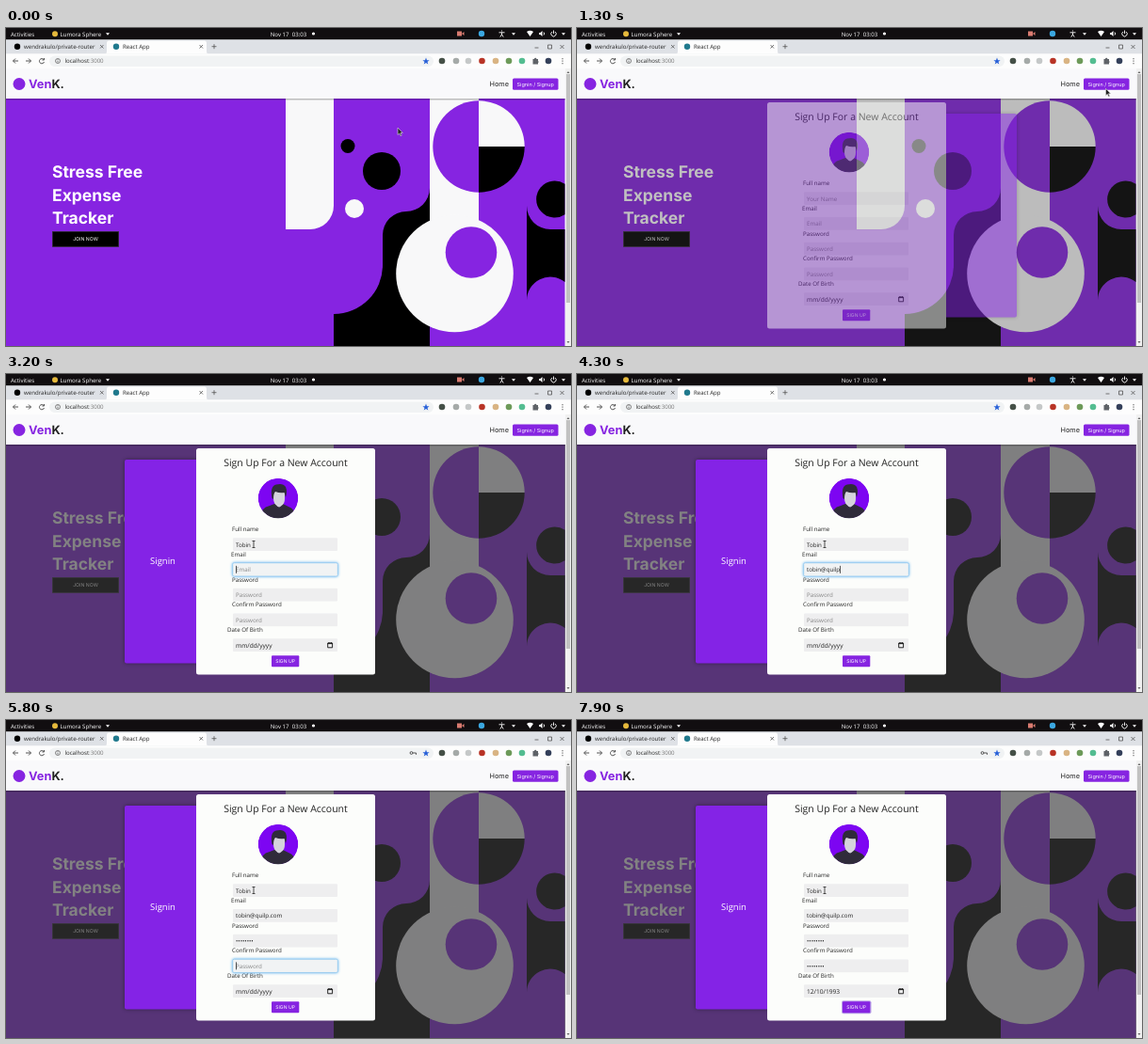
Animation, 600 px wide and 338 px high, one loop 8 s. Source, as an HTML page:

```html
<!DOCTYPE html>
<html lang="en">
<head>
<meta charset="utf-8">
<title>Expense tracker sign-up</title>
<style>
html, body { margin: 0; width: 100%; height: 100%; overflow: hidden; background: #f9f9fb; }
svg { display: block; width: 600px; height: 338px; }
text { font: 6.2px "Open Sans", "Noto Sans", sans-serif; fill: #222; text-rendering: geometricPrecision; }
.geo { font-family: Inter, "Open Sans", sans-serif; }
.mid { text-anchor: middle; }
.lite { fill: #fff; }
.ui { font: 6.1px "Open Sans", Roboto, sans-serif; }
.big { font-size: 17.5px; font-weight: 700; }
.p { fill: #8624e1; }
.w { fill: #f8f8f9; }
.line { fill: none; stroke: #555; }
#glow { filter: drop-shadow(0 0 1.6px #56aef0); }
#panel { filter: drop-shadow(0 0 2px #0006); }
</style>
</head>
<body>
<svg viewBox="0 0 600 338">
  <defs>
    <clipPath id="round"><circle cx="289" cy="132" r="21.3"/></clipPath>
    <clipPath id="view"><path d="M0 75H594V338H0Z"/></clipPath>
    <linearGradient id="shade" x2="0" y2="1">
      <stop stop-color="#000" stop-opacity=".3"/><stop offset="1" stop-color="#000" stop-opacity="0"/>
    </linearGradient>
  </defs>
  <rect width="600" height="338" fill="#f9f9fb"/>

  <g clip-path="url(#view)">
    <g id="page">
      <path class="p" d="M0 43H593.5V351H3Q0 351 0 348Z"/>
      <path class="w" d="M297 43H348V189A25 25 0 0 1 323 214H297Z"/>
      <circle cx="363" cy="125.5" r="7.5"/>
      <circle cx="399" cy="152" r="20"/>
      <circle class="w" cx="370" cy="192" r="10"/>
      <path d="M450 170A25 25 0 0 1 425 195A25 25 0 0 0 400 220V252A52 52 0 0 1 348 304V351H450Z"/>
      <path class="w" d="M450 43H502V220H450Z"/>
      <circle class="w" cx="476.5" cy="261" r="62.3"/>
      <circle class="p" cx="494" cy="238.5" r="27.3"/>
      <circle class="p" cx="502" cy="126" r="48.7"/>
      <path class="w" d="M502 126V77.3A48.7 48.7 0 0 1 550.7 126Z"/>
      <path d="M502 126H550.7A48.7 48.7 0 0 1 502 174.7Z"/>
      <path d="M593.5 165.8A19.5 19.5 0 1 0 593.5 198.2Z"/>
      <path d="M553 189A25 25 0 0 0 578 214H593.5V270A25 25 0 0 0 553 290Z"/>
      <text class="geo big lite" x="49" y="159">Stress Free</text>
      <text class="geo big lite" x="49" y="183.5">Expense</text>
      <text class="geo big lite" x="49" y="208">Tracker</text>
      <rect x="49.3" y="216.3" width="70.4" height="16.2" stroke="#333" stroke-width=".6"/>
      <text class="geo lite mid" x="84.5" y="226.2" style="font-size:5.2px">JOIN NOW</text>
      <text x="6.5" y="372" style="font-weight:700">2020 | Sed Ibalk</text>
    </g>
    <rect id="dim" y="75" width="594" height="263" fill="#3e3e3e" fill-opacity=".645"/>
  </g>

  <rect y="43" width="594" height="32" fill="#f9f9fb"/>
  <rect y="75" width="594" height="2.5" fill="url(#shade)"/>
  <circle class="p" cx="14" cy="59.5" r="6.5"/>
  <text class="geo" x="24" y="63.7" style="font-size:12.8px;font-weight:700"><tspan class="p">Ven</tspan>K.</text>
  <text class="geo" x="513.5" y="62" style="font-size:7.3px">Home</text>
  <rect class="p" x="538" y="53.5" width="48.5" height="12.2" rx="1.5"/>
  <text class="geo lite mid" x="562.2" y="61.5" style="font-size:5.5px">Signin / Signup</text>

  <rect x="594" y="43" width="6" height="295" fill="#f1f1f1"/>
  <rect id="thumb" x="595" y="49" width="4" height="243" fill="#c1c1c1"/>
  <path fill="#666" d="M595.5 48L597 46L598.5 48ZM595.5 333L597 335L598.5 333Z"/>

  <rect width="600" height="12.5" fill="#110e10"/>
  <text class="ui lite" x="5" y="8.6">Activities</text>
  <circle cx="52" cy="6.2" r="3" fill="#e5b93c"/>
  <text class="ui lite" x="57.5" y="8.6">Lumora Sphere</text>
  <text class="ui lite mid" x="300" y="8.6">Nov 17&#160; 03:03</text>
  <circle class="lite" cx="326.5" cy="6" r="1.6"/>
  <path class="lite" d="M106 5.2H110L108 7.8ZM590 5.2H594L592 7.8ZM537 5.2H541L539 7.8ZM553 4Q556.500 1.500 560 4L556.500 9ZM566 5H567.500L569.500 3V9L567.500 7H566Z"/>
  <path fill="#d97b70" d="M479 3.500H484V8.500H479ZM484 6L486.500 4V8Z"/>
  <circle cx="505" cy="6" r="3.2" fill="#3ba7e0"/>
  <path fill="none" stroke="#fff" stroke-width=".9" d="M523.500 4.800H529.500M526.500 4.800V7L524.800 9.500M526.500 7L528.200 9.500M526.500 2.500V3.500M571 4.500Q572.300 6 571 7.500M580 4A2.700 2.700 0 1 0 583 4M581.500 2.500V6"/>

  <rect y="12.500" width="600" height="15" fill="#dee1e6"/>
  <path fill="#fdfdfd" d="M105 27.500Q107 27.500 107 25V16Q107 13.500 109.500 13.500H210.500Q213 13.500 213 16V25Q213 27.500 215 27.500Z"/>
  <circle cx="12" cy="19.700" r="3.200"/>
  <text class="ui" x="19" y="22">wendrakulo/private-router</text>
  <circle cx="117" cy="19.700" r="3.200" fill="#20798d"/>
  <text class="ui" x="124" y="22">React App</text>
  <path class="line" stroke-width=".8" d="M100 18L103.500 21.500M103.500 18L100 21.500M205.500 18L209 21.500M209 18L205.500 21.500M218.500 19.700H223.500M221 17.200V22.200M561.500 21H565.500M575.500 18H579.500V22H575.500ZM588.500 18L592.500 22M592.500 18L588.500 22"/>

  <rect y="27.500" width="600" height="15.500" fill="#fdfdfd"/>
  <rect x="46" y="29.500" width="408" height="11.500" rx="5.700" fill="#f1f3f4"/>
  <path class="line" d="M13 35H7.500M10 32.500L7.500 35L10 37.500M21 35H26.500M24 32.500L26.500 35L24 37.500M40 33.500A2.600 2.600 0 1 0 40.500 36M40.500 32V34H38.500"/>
  <circle class="line" cx="55" cy="35" r="2.500" stroke-width=".7"/>
  <path class="line" stroke-width=".8" d="M55 34.700V36.500M55 33.300V34"/>
  <text class="ui" x="62.500" y="37.300">localhost<tspan fill="#777">:3000</tspan></text>
  <g id="key" class="line"><circle cx="430.500" cy="35" r="1.400"/><path d="M432 35H435.500V36.800"/></g>
  <path fill="#2a62d8" d="M446 31.600L447 34.200L449.600 34.300L447.500 35.900L448.300 38.500L446 37L443.700 38.500L444.500 35.900L442.400 34.300L445 34.200Z"/>
  <g id="tools"></g>
  <path class="line" stroke="#444" d="M591 32V33.300M591 34.500V35.800M591 37V38.300"/>
  <path fill="#5f6368" d="M559.500 33H561A1.200 1.200 0 0 1 563.400 33H565V35A1.200 1.200 0 0 1 565 37V38.500H559.500Z"/>

  <g id="modal">
    <g id="panel">
      <rect x="126" y="91" width="81" height="216.500" rx="2" fill="#8423e6"/>
      <text id="signin" class="lite mid" x="166.500" y="202" style="font-size:9.500px">Signin</text>
    </g>
    <rect x="202" y="79" width="190" height="240.500" rx="2.500" fill="#fcfdfb"/>
    <text class="mid" x="297" y="98" style="font-size:10.500px">Sign Up For a New Account</text>
    <g clip-path="url(#round)">
      <circle cx="289" cy="132" r="21.300" fill="#7d05f2"/>
      <path fill="#2f2b3a" d="M268 156Q270 142 280 140L285 138H294L300 141Q307 143 310 156Z"/>
      <path fill="#d5d3dc" d="M284 125Q289 121 296 125V133Q296 138 292.500 140Q290 143 287 139.500Q283 137 284 125Z"/>
      <path fill="#2f2b3a" d="M282.500 132Q280 119 287 117.500Q294 115.500 297 120Q299 125 297 131L295.500 126Q291 127 286 125Q284 127 284 133Z"/>
    </g>
    <g id="form"></g>
    <rect id="ring" x="281" y="298.300" width="31.500" height="14" rx="2" fill="#b9a3e6"/>
    <rect class="p" x="282" y="299.300" width="29.300" height="12" rx="1"/>
    <text class="geo lite mid" x="296.600" y="307.100" style="font-size:5.100px">SIGN UP</text>
  </g>

  <path id="arrow" fill="#222" stroke="#ddd" stroke-width=".6" d="M0 0V7.500L1.800 6L3 8.700L4.200 8.100L3 5.500H5.300Z"/>
  <path id="beam" fill="none" stroke="#222" stroke-width=".8" d="M-1.500 -3.500H1.500M0 -3.500V3.500M-1.500 3.500H1.500"/>
</svg>
<script>
const LOOP = 8000;
const $ = id => document.getElementById(id);
const set = (el, attrs) => { for (const k in attrs) el.setAttribute(k, attrs[k]); return el; };
const add = (parent, tag, attrs, text = '') => {
  const el = set(document.createElementNS('http://www.w3.org/2000/svg', tag), attrs);
  el.textContent = text;
  return parent.appendChild(el);
};
const clamp = (v, lo, hi) => Math.max(lo, Math.min(hi, v));
const show = (el, on) => el.setAttribute('opacity', +on);

// Eased value between [time, value...] stops
function track(t, stops) {
  const i = stops.findIndex(s => s[0] > t);
  if (i === 0) return stops[0].slice(1);
  if (i < 0) return stops.at(-1).slice(1);
  const [a, b] = [stops[i - 1], stops[i]];
  const u = (t - a[0]) / (b[0] - a[0]), e = u * u * (3 - 2 * u);
  return a.slice(1).map((v, k) => v + (b[k + 1] - v) * e);
}

[[463, '#455047'], [478, '#a5aaa8'], [491, '#c5c8c8'], [505.5, '#b83325'],
 [520, '#d9b483'], [534, '#6d9a59'], [548, '#54bd91'], [576, '#34405a']]
  .forEach(([cx, fill]) => add($('tools'), 'circle', { cx, cy: 35, r: 3.3, fill }));

const form = $('form');
const rowY = i => 174.3 + 26.75 * i;
const rows = [['Full name', 240, 'Your Name'], ['Email', 239, 'Email'], ['Password', 240, 'Password'],
  ['Confirm Password', 240, 'Password'], ['Date Of Birth', 235, 'mm/dd/yyyy']];
rows.forEach(([label, x], i) => {
  add(form, 'text', { x, y: rowY(i) - 7.2 }, label);
  add(form, 'rect', { x: 241, y: rowY(i), width: 111, height: 13.6, rx: 1, fill: '#eeeeef' });
});
const glow = add(form, 'rect', { id: 'glow', x: 240.7, width: 111.6, height: 14.2, rx: 1.5,
  fill: '#f1f3f4', stroke: '#8bc6ee', 'stroke-width': .7 });
const mark = add(form, 'rect', { height: 8, fill: '#a9cdf8' });
const inputs = rows.map((r, i) => add(form, 'text',
  { x: 244, y: rowY(i) + 9.2, style: i === 4 ? 'font-size:6.6px' : '' }));
const caret = add(form, 'rect', { width: .7, height: 8, fill: '#111' });
add(form, 'path', { d: 'M341.700 286H346.600V290.800H341.700ZM341.700 286.600H346.600M343 285V286M345.300 285V286',
  fill: 'none', stroke: '#111', 'stroke-width': .9 });
const iconRing = add(form, 'rect', { x: 340, y: 283.5, width: 8.3, height: 8.8, rx: 1,
  fill: 'none', stroke: '#333', 'stroke-width': .7 });

const focusTimes = [2400, 3100, 4700, 5600, 6600, 7700, 7800];

function draw(t) {
  const [scroll] = track(t, [[300, 0], [600, 31], [930, 31], [1150, 0]]);
  set($('page'), { transform: `translate(0 ${-scroll})` });
  set($('thumb'), { y: 49 + scroll * .83 });

  const [fade] = track(t, [[1200, 0], [1400, 1]]);
  set($('dim'), { opacity: fade });
  set($('modal'), { opacity: fade });
  const [slide] = track(t, [[1740, 260], [1990, 0]]);
  set($('panel'), { transform: `translate(${slide} 0)` });
  show($('signin'), slide < 40);
  show($('key'), t >= 4900);

  const typed = (start, step) => Math.max(0, Math.floor((t - start) / step) + 1);
  const n = typed(6700, 100);
  const date = [['mm', '01', '12'][Math.min(n, 2)], ['dd', '01', '10'][clamp(n - 2, 0, 2)],
    ['yyyy', '0001', '0019', '0199', '1993'][clamp(n - 4, 0, 4)]].join('/');
  const values = ['Tobin'.slice(0, typed(2600, 100)), 'tobin@quilp.com'.slice(0, typed(3500, 75)),
    '•'.repeat(Math.min(8, typed(4900, 80))), '•'.repeat(Math.min(8, typed(5900, 80))), date];
  inputs.forEach((el, i) => {
    el.textContent = values[i] || rows[i][2];
    el.style.fill = values[i] ? '#222' : '#858585';
  });

  const focus = focusTimes.filter(s => t >= s).length - 1;
  const inField = focus >= 0 && focus < 5, y = rowY(clamp(focus, 0, 4));
  show(glow, inField || focus === 5);
  set(glow, { y: y - .3 });
  show(iconRing, focus === 5);
  show($('ring'), focus === 6);

  show(mark, focus === 4);
  if (focus === 4) {
    const part = n < 2 ? 0 : n < 4 ? 1 : 2, first = part * 3;
    set(mark, { x: inputs[4].getStartPositionOfChar(first).x, y: y + 2.8,
      width: inputs[4].getSubStringLength(first, part === 2 ? 4 : 2) });
  }
  const blink = inField && focus < 4 && (t - focusTimes[focus]) % 1000 < 500;
  show(caret, blink);
  if (blink) set(caret, { x: 244 + (values[focus] ? inputs[focus].getComputedTextLength() : 0), y: y + 2.8 });

  const [mx, my] = track(t, [[300, 416, 106], [900, 577, 82], [1100, 567, 60], [1250, 567, 60],
    [1650, 444, 157], [1850, 444, 157], [2000, 412, 157], [2400, 263, 181]]);
  const text = mx < 352;
  show($('arrow'), !text);
  show($('beam'), text);
  set($(text ? 'beam' : 'arrow'), { transform: `translate(${mx} ${my})` });
}

function frame(now) {
  draw(now % LOOP);
  requestAnimationFrame(frame);
}
draw(0);
requestAnimationFrame(frame);
</script>
</body>
</html>
```
